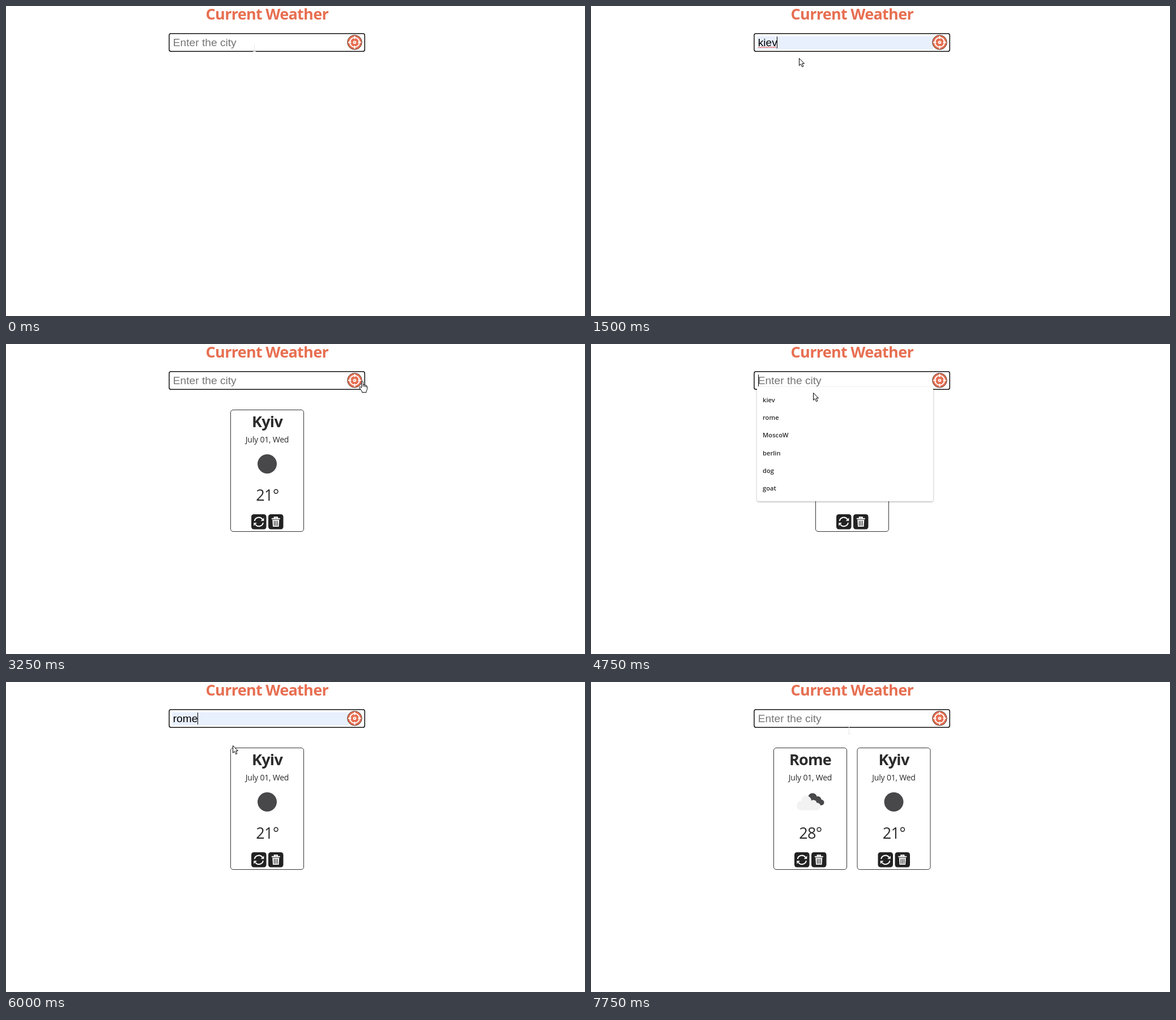
Write an HTML page that moves like this. It is 1022 px wide and 548 px high and loops after 8 s.

```html
<!DOCTYPE html>
<html lang="en">
<head>
<meta charset="utf-8">
<title>Current Weather</title>
<style>
  html, body { margin: 0; width: 100%; height: 100%; overflow: hidden; background: #fff; }
  svg { display: block; }
  text { font-family: "Open Sans", "Noto Sans", sans-serif; fill: #2b2b2b; }
  .big { font-size: 27px; letter-spacing: -.7px; text-anchor: middle; }
  .bold { font-weight: 700; }
  .date { font-size: 14px; letter-spacing: -.2px; text-anchor: middle; }
  .field { font: 19.2px "Liberation Sans", Arial, sans-serif; fill: #000; }
  .item { font-size: 11.2px; font-weight: 600; }
  .line { fill: none; stroke: #fff; stroke-width: 2; }
  .cursor { fill: #fff; stroke: #000; stroke-width: 1; stroke-linejoin: round; }
  #drop { filter: drop-shadow(0 1px 1.5px rgba(0, 0, 0, .35)); }
</style>
</head>
<body>
<svg width="1022" height="548" viewBox="0 0 1022 548">
  <defs>
    <g id="buttons">
      <rect x="-28" y="301" width="26.5" height="26.5" rx="4.5" fill="#222"/>
      <rect x="2" y="301" width="26.5" height="26.5" rx="4.5" fill="#222"/>
      <g transform="translate(-14.7 314.4)">
        <path class="line" d="M-7.6 -1.5A7.7 7.7 0 0 1 6.2 -4.6M7.6 1.5A7.7 7.7 0 0 1 -6.2 4.6"/>
        <path fill="#fff" d="M9 -7.2V-1.6H3.4ZM-9 7.2V1.6H-3.4Z"/>
      </g>
      <g transform="translate(15.3 314.4)">
        <path class="line" d="M-7.4 -5.6H7.4M-2.6 -6V-8.2H2.6V-6"/>
        <path fill="#fff" d="M-6 -3.6H6L5.2 8.6H-5.2Z"/>
        <path stroke="#222" stroke-width="1.2" d="M-2.8 -1.8V7M0 -1.8V7M2.8 -1.8V7"/>
      </g>
    </g>
    <circle id="sun" cy="212" r="17" fill="#48484a"/>
    <g id="clouds">
      <g fill="#48484a">
        <circle cx="4" cy="204.5" r="8"/><circle cx="13.5" cy="207.5" r="5.5"/>
        <circle cx="19.5" cy="213" r="5"/><rect x="2" y="206" width="17.5" height="12"/>
      </g>
      <g fill="#f2f2f2">
        <circle cx="-16" cy="218.5" r="8"/><circle cx="-7" cy="210" r="9"/>
        <circle cx="5.500" cy="214.500" r="6"/><circle cx="12" cy="220" r="6.5"/>
        <rect x="-16" y="214" width="28" height="12.5"/>
      </g>
    </g>
  </defs>

  <text class="big bold" x="460.8" y="24" style="fill:#e76f51">Current Weather</text>
  <g id="cards"></g>

  <rect id="fill" x="293" y="53.5" width="311" height="23.5" fill="#e8f0fe"/>
  <rect x="288" y="48.8" width="345.2" height="31.5" rx="3.2" fill="none" stroke="#101010" stroke-width="1.5"/>
  <text id="field" class="field" x="294.7" y="71"></text>
  <path id="squiggle" fill="none" stroke="#e8403a" stroke-width="1"/>
  <rect id="caret" y="54" width="1" height="21" fill="#000"/>
  <g transform="translate(615.4 64.2)">
    <circle r="12.8" fill="#e76f51" stroke="#5b4038"/>
    <circle class="line" r="8.4"/>
    <path class="line" d="M-11.5 0H-6M6 0H11.5M0 -11.5V-6M0 6V11.5"/>
    <circle r="2.8" fill="#fff"/><circle r=".9" fill="#e76f51"/>
  </g>

  <g id="drop">
    <path d="M293 76H604V274.5Q604 278 600.5 278H296.5Q293 278 293 274.5Z" fill="#fff"/>
    <rect id="mark" x="293" width="311" height="31" fill="#c8c8c9"/>
    <g id="items"></g>
  </g>

  <path id="beam" fill="none" stroke="#e6e6e6" d="M.5 -6V6M-2 6.5H3"/>
  <path id="arrow" class="cursor" d="M.5 .5V13.3L3.4 10.6 5.6 15.6 7.9 14.6 5.7 9.7H9.5Z"/>
  <path id="hand" class="cursor" d="M-1.5 9.5V1.2Q-1.5 0 -.2 0T1.2 1.2V6Q3.5 5.2 4 6.8Q6 6 6.4 7.6Q8.5 7.4 8.5 9.2V13.5Q8 16 7 17.5V19.5H-.5V18Q-2.5 15.5 -5 11.5Q-5.5 9.6 -3.9 9.5Q-2.6 10 -1.5 11.5ZM1.2 6V9.5M4 7V10M6.4 8V10.5"/>
</svg>
<script>
const $ = id => document.getElementById(id);
const LOOP = 8000;
const cities = ["kiev", "rome", "MoscoW", "berlin", "dog", "goat"];
const rowStep = 31.25;

$("items").innerHTML = cities.map((name, i) =>
  `<text class="item" x="303" y="${102.8 + i * rowStep}">${name}</text>`).join("");

let zigzag = "M295 74";
for (let x = 297, up = true; x <= 328; x += 2, up = !up) zigzag += `L${x} ${up ? 72 : 74}`;
$("squiggle").setAttribute("d", zigzag);

const card = (x, city, degrees, icon) => `<g transform="translate(${x} 0)">
  <rect x="-64.5" y="116.5" width="129" height="215" rx="4.5" fill="#fff" stroke="#333"/>
  <text class="big bold" y="147">${city}</text>
  <text class="date" y="174">July 01, Wed</text>
  <use href="#${icon}"/>
  <text class="big" x=".5" y="276.5">${degrees}°</text>
  <use href="#buttons"/></g>`;

const cardSets = [
  "",
  card(461, "Kyiv", 21, "sun"),
  card(387, "Rome", 28, "clouds") + card(534.5, "Kyiv", 21, "sun")
];

// Each step changes only the listed parts; row: null = closed, -1 = no row marked.
const changes = [
  [0, { cursor: ["beam", 438, 74], text: "", preview: false, caret: 0, row: null, cards: 0 }],
  [250, { cursor: ["none", 0, 0] }],
  [750, { row: -1, caret: 295 }],
  [1000, { cursor: ["arrow", 390, 88] }],
  [1250, { cursor: ["arrow", 367, 92], row: 0, text: "kiev", preview: true }],
  [1500, { row: null, preview: false, caret: 328 }],
  [1750, { cursor: ["arrow", 450, 84] }],
  [2000, { cursor: ["beam", 575, 70], caret: 0 }],
  [2250, { cursor: ["hand", 629, 66] }],
  [2750, { text: "", cards: 1 }],
  [3750, { cursor: ["beam", 570, 72] }],
  [4000, { cursor: ["beam", 495, 74] }],
  [4500, { cursor: ["beam", 440, 70], row: -1, caret: 295 }],
  [4750, { cursor: ["arrow", 392, 86] }],
  [5000, { cursor: ["arrow", 362, 118], row: 1, text: "rome", preview: true }],
  [5250, { cursor: ["arrow", 345, 131] }],
  [5500, { caret: 0 }],
  [5750, { row: null, preview: false, caret: 338 }],
  [6000, { cursor: ["arrow", 400, 112] }],
  [6250, { cursor: ["arrow", 490, 88], caret: 0 }],
  [6500, { cursor: ["beam", 575, 72] }],
  [6750, { cursor: ["hand", 627, 69] }],
  [7250, { text: "", cards: 2 }],
  [7500, { cursor: ["beam", 540, 72] }],
  [7750, { cursor: ["beam", 455, 85] }]
];

const steps = [];
changes.reduce((state, [at, change]) => {
  const next = { ...state, ...change, at };
  steps.push(next);
  return next;
}, {});

const show = (id, on) => { $(id).style.display = on ? "" : "none"; };

function draw(s) {
  $("cards").innerHTML = cardSets[s.cards];
  const field = $("field");
  field.textContent = s.text || "Enter the city";
  field.style.fill = s.text ? "#000" : "#757575";
  field.style.fontSize = s.preview ? "12px" : "19.2px";
  show("fill", s.text);
  show("squiggle", s.text === "kiev" && !s.preview);
  show("caret", s.caret);
  $("caret").setAttribute("x", s.caret);
  show("drop", s.row !== null);
  show("mark", s.row !== null && s.row >= 0);
  $("mark").setAttribute("y", 83 + Math.max(0, s.row) * rowStep);
  const [kind, x, y] = s.cursor;
  for (const id of ["beam", "arrow", "hand"]) show(id, id === kind);
  if (kind !== "none") $(kind).setAttribute("transform", `translate(${x} ${y})`);
}

const start = performance.now();
let shown;
function tick() {
  const t = (performance.now() - start) % LOOP;
  const now = steps.findLast(s => s.at <= t);
  if (now !== shown) draw(shown = now);
  requestAnimationFrame(tick);
}
tick();
</script>
</body>
</html>
```
